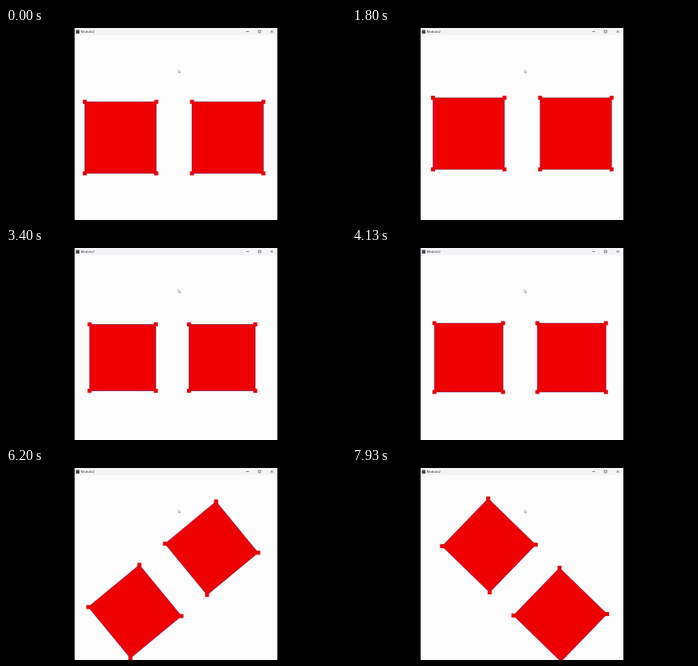
Animation, 426 px wide and 240 px high, one loop 8000 ms. Source, as an HTML page with a canvas:

```html
<!DOCTYPE html>
<html lang="en">
<head>
<meta charset="utf-8">
<title>Two cubes</title>
<style>
  html, body { margin: 0; width: 100%; height: 100%; overflow: hidden; background: #000; }
  canvas { display: block; width: 100vw; height: 100vh; }
</style>
</head>
<body>
<canvas></canvas>
<script>
const WIDTH = 426, HEIGHT = 240, LOOP = 8000, STEP = 1000 / 15;
const WIN = { left: 86, width: 254, bar: 9 };
const PIVOT = { x: 213, y: 137 };
const RED = '#ef0000', POINT_RED = '#e60006', GREEN = '#30f510', MAGENTA = '#f000f0';

// Each track is a list of [time, value] pairs.
const tracks = {
  x: [[0, -69.5], [900, -66.75]],
  y: [[1000, 0], [1800, -5], [2600, 0]],
  size: [[2700, 89.5], [3400, 83], [4130, 86], [4600, 83]],
  pitch: [[4760, 0], [5160, 22.4], [5400, 9], [5560, 0]],
  roll: [[5490, 0], [7000, -84], [7930, -135.7], [8000, -139.6]]
};

const canvas = document.querySelector('canvas');
const ctx = canvas.getContext('2d');

function valueAt(track, t) {
  if (t <= track[0][0]) return track[0][1];
  for (let i = 1; i < track.length; i++) {
    const [t0, v0] = track[i - 1], [t1, v1] = track[i];
    if (t <= t1) return v0 + (v1 - v0) * (t - t0) / (t1 - t0);
  }
  return track[track.length - 1][1];
}

function box(color, x, y, w, h) {
  ctx.fillStyle = color;
  ctx.fillRect(x, y, w, h);
}

function polygon(points, fill, line, width) {
  ctx.beginPath();
  points.forEach(([x, y]) => ctx.lineTo(x, y));
  ctx.closePath();
  ctx.fillStyle = fill;
  ctx.fill();
  ctx.strokeStyle = line;
  ctx.lineWidth = width;
  ctx.stroke();
}

function drawPoints(points, color) {
  points.forEach(([x, y]) => box(color, x - 2.5, y - 2.5, 5, 5));
}

function drawCube(cx, cy, size, pitch, roll) {
  const half = size / 2, cos = Math.cos(roll), sin = Math.sin(roll);
  const project = (x, y, z) => {
    const px = cx + x, py = cy + y * Math.cos(pitch) + z * Math.sin(pitch);
    return [PIVOT.x + px * cos - py * sin, PIVOT.y + px * sin + py * cos];
  };
  const face = z => [[-1, -1], [1, -1], [1, 1], [-1, 1]]
    .map(([x, y]) => project(x * half, y * half, z * half));
  const front = face(1), back = face(-1);
  const edge = 'rgba(60, 0, 110, 0.6)';

  if (pitch > 0.001) {
    drawPoints(back, GREEN);
    polygon([back[0], back[1], front[1], front[0]], MAGENTA, edge, 0.8);
  }
  polygon(front, RED, edge, 0.8);
  drawPoints(front, POINT_RED);
}

function drawTitleBar() {
  box('#f4f4f7', WIN.left, 0, WIN.width, WIN.bar);
  box('#4a4a52', 87.5, 2.5, 4.5, 4.5);
  ctx.fillStyle = '#222';
  ctx.font = '4.2px "Open Sans", sans-serif';
  ctx.fillText('Modulo2', 93.5, 6.2);

  ctx.strokeStyle = '#333';
  ctx.lineWidth = 0.6;
  ctx.beginPath();
  ctx.moveTo(301, 4.5);
  ctx.lineTo(304.5, 4.5);
  ctx.rect(316.2, 3, 3, 3);
  ctx.moveTo(331.5, 3);
  ctx.lineTo(334.5, 6);
  ctx.moveTo(334.5, 3);
  ctx.lineTo(331.5, 6);
  ctx.stroke();
}

function drawCursor() {
  polygon([[216, 52.3], [216, 56], [217, 55.3], [217.7, 56.6], [218.3, 56.2],
    [217.8, 55], [218.8, 54.8]], '#fff', 'rgba(60, 60, 70, 0.7)', 0.5);
}

function draw(t) {
  const at = name => valueAt(tracks[name], t);
  const size = at('size'), x = at('x'), y = at('y');
  const pitch = at('pitch') * Math.PI / 180, roll = at('roll') * Math.PI / 180;

  ctx.setTransform(canvas.width / WIDTH, 0, 0, canvas.height / HEIGHT, 0, 0);
  box('#000', 0, 0, WIDTH, HEIGHT);
  box('#fcfcfd', WIN.left, 0, WIN.width, HEIGHT);

  ctx.save();
  ctx.beginPath();
  ctx.rect(WIN.left, WIN.bar, WIN.width, HEIGHT);
  ctx.clip();
  drawCube(x, y, size, pitch, roll);
  drawCube(x + size * 1.5, y, size, pitch, roll);
  ctx.restore();

  drawTitleBar();
  drawCursor();
}

function resize() {
  const ratio = window.devicePixelRatio || 1;
  canvas.width = Math.round(innerWidth * ratio);
  canvas.height = Math.round(innerHeight * ratio);
}

let start;
function frame(now) {
  start ??= now;
  const elapsed = (now - start) % LOOP;
  // The picture advances at 15 steps per second; 4 ms absorbs timer rounding.
  draw(Math.floor((elapsed + 4) / STEP) * STEP);
  requestAnimationFrame(frame);
}

addEventListener('resize', resize);
resize();
draw(0);
requestAnimationFrame(frame);
</script>
</body>
</html>
```
